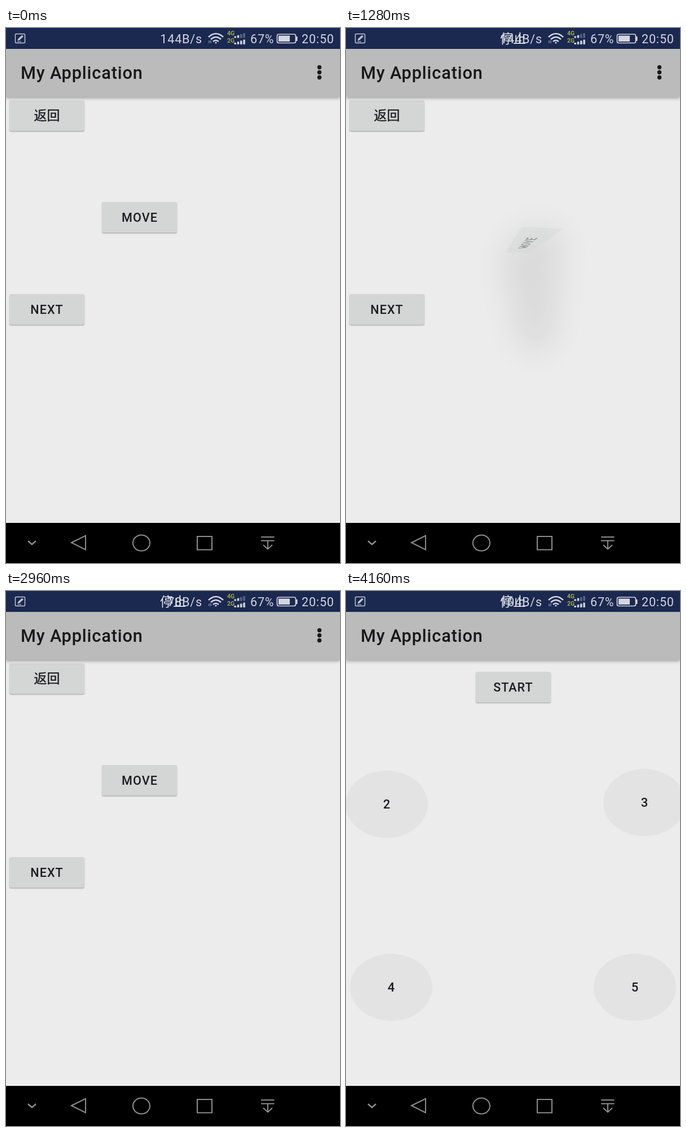
Write an HTML page that moves like this. It is 592 px wide and 947 px high and loops after 4.24 s.

```html
<!DOCTYPE html>
<html lang="en">
<head>
<meta charset="utf-8">
<title>My Application</title>
<style>
  html, body { margin: 0; width: 100%; height: 100%; overflow: hidden; background: #ececec; }
  #stage { position: relative; width: 592px; height: 947px; overflow: hidden; background: #ececec;
    font-family: Roboto, "Noto Sans CJK SC", "Noto Sans CJK", sans-serif; color: #1b1c20; }
  svg { position: absolute; left: 0; top: 0; }
  .page { position: absolute; left: 0; top: 0; width: 592px; height: 947px; background: #ececec; }
  .bar { position: absolute; top: 37px; width: 592px; height: 85px; background: #bbb;
    box-shadow: 0 2px 6px rgba(0, 0, 0, .35); }
  .bar span { position: absolute; left: 26px; line-height: 85px; font-size: 30.8px; font-weight: 500;
    letter-spacing: .8px; white-space: nowrap; color: #18181a; }
  .btn { --press: 0; position: absolute; width: 133px; height: 54px; border-radius: 3px;
    background: linear-gradient(rgba(0, 0, 0, var(--press)), rgba(0, 0, 0, var(--press))) #d4d6d5;
    box-shadow: 0 1.5px 2px rgba(0, 0, 0, .28);
    font-size: 21.6px; font-weight: 500; letter-spacing: 1px; text-indent: 1px; line-height: 55px; text-align: center; }
  #back { font-size: 23px; letter-spacing: 0; -webkit-text-stroke: .4px #1b1c20; }
  .ball { position: absolute; width: 146px; height: 119px; margin: -59.5px 0 0 -73px; border-radius: 50%;
    background: #e3e3e3; font-size: 22px; font-weight: 500; line-height: 119px; text-align: center; }
  #dot { position: absolute; width: 34px; height: 34px; margin: -18px; border-radius: 50%;
    border: 1px solid rgba(180, 184, 205, .9); background: rgba(228, 228, 228, .6); }
  .status { fill: #d3d6e0; font-size: 21.6px; letter-spacing: .8px; }
  #stop { fill: #e8eaf0; font-size: 23px; letter-spacing: 0; }
</style>
</head>
<body>
<div id="stage">
  <div class="page" id="first">
    <svg width="592" height="947"><g id="shade"></g></svg>
    <div class="btn" id="back" style="left:5.5px;top:128px">返回</div>
    <div class="btn" id="next" style="left:5.5px;top:471px">NEXT</div>
    <div class="btn" id="move" style="left:170px;top:307.5px">MOVE</div>
    <div class="bar"><span>My Application</span>
      <svg width="592" height="85" fill="#1a1a1a">
        <circle cx="555.5" cy="32.5" r="3.7"/><circle cx="555.5" cy="41.5" r="3.7"/><circle cx="555.5" cy="50.5" r="3.7"/>
      </svg>
    </div>
  </div>
  <div class="page" id="second" style="overflow:hidden">
    <div class="btn" style="left:229.5px;top:143px">START</div>
    <div class="bar"><span>My Application</span></div>
  </div>
  <div id="dot"></div>

  <svg width="592" height="947" fill="none">
    <rect width="592" height="37" fill="#1b2850"/>
    <g stroke="#c3c7d4" stroke-width="1.5">
      <rect x="16.5" y="10.5" width="17" height="16" rx="1.5"/>
      <path d="M21 22l1-3 6.5-6 2 2-6.5 6z" fill="#c3c7d4" stroke-width=".8"/>
      <path d="M20 24h7" stroke-width="1"/>
    </g>
    <text id="rate" class="status" x="348" y="27" text-anchor="end"></text>
    <text id="stop" class="status" x="273" y="27">停止</text>
    <g stroke="#d3d6e0" stroke-width="2.6">
      <path d="M359 16Q372 4 385 16M363 20Q372 12 381 20M367 24Q372 19.5 377 24"/>
      <circle cx="372" cy="26" r="1.6" fill="#d3d6e0" stroke="none"/>
      <path d="M360 22v5M363 22v5" stroke-width="1.2" stroke="#9aa1b8"/>
    </g>
    <g fill="#a0ab48" font-size="10.5" font-weight="700">
      <text x="392" y="13">4G</text><text x="392" y="26">2G</text>
    </g>
    <g id="bars"></g>
    <text class="status" x="433" y="27">67%</text>
    <rect x="480.5" y="11" width="33" height="15.5" rx="3" stroke="#d3d6e0" stroke-width="1.7"/>
    <rect x="483" y="13.5" width="20" height="10.5" fill="#d3d6e0"/>
    <rect x="514" y="15" width="2.5" height="8" fill="#d3d6e0"/>
    <text class="status" x="524" y="27">20:50</text>

    <rect y="876" width="592" height="71" fill="#000"/>
    <g stroke="#8d8d8d" stroke-width="2">
      <path d="M39 908l7 6 7-6" stroke-width="2.5"/>
      <path d="M116 911l25-12.5v25z"/>
      <ellipse cx="240" cy="911.5" rx="15" ry="14"/>
      <rect x="339" y="900" width="26" height="23.5"/>
      <path d="M452 901h23.5M452 907.5h23.5M464 908v14M456 915l8 7.5 8-7.5"/>
    </g>
  </svg>
</div>

<script>
const LOOP = 4240, STEP = 80;
const $ = id => document.getElementById(id);
const clamp = v => Math.max(0, Math.min(1, v));
const ease = u => (1 - Math.cos(Math.PI * clamp(u))) / 2;
const DEPTH = 400, REST = { x: 236.5, y: 334.5, w: 133, h: 54 };

const taps = [
  { id: 'move', at: 440, x: 240, y: 338 },
  { id: 'back', at: 1760, x: 88.5, y: 141 },
  { id: 'next', at: 3200, x: 76, y: 496 }
];

// label, resting place, drift
const balls = [
  ['2', 72, 369, 0, 8], ['3', 520, 369, 9, 5],
  ['4', 72, 709, 8, -8], ['5', 520, 709, -8, -8]
].map(([label, x, y, dx, dy]) => {
  const el = document.createElement('div');
  el.className = 'ball';
  el.textContent = label;
  el.style.left = x + 'px';
  el.style.top = y + 'px';
  $('second').append(el);
  return { el, dx, dy };
});

// signal strength: two rows of rising bars
$('bars').innerHTML = [[17.5, 2], [29, 4]].map(([base, lit]) =>
  [0, 1, 2, 3].map(i => {
    const h = 3 + i * 1.8;
    return `<rect x="${404.5 + i * 5.3}" y="${base - h}" width="3.4" height="${h}"
      fill="${i < lit ? '#d3d6e0' : '#5d6787'}"/>`;
  }).join('')).join('');

function progress(t) {
  return t < 1800 ? ease((t - 510) / 1120) : 1 - ease((t - 1800) / 1135);
}

// corner of the turned button: its place on screen and where its shadow falls
function corner(x, y, a, cx, cy) {
  const c = Math.cos(a), s = Math.sin(a);
  const rx = x * c - y * s, ry = x * s + y * c;
  const z = ry * s, k = DEPTH / (DEPTH - z), lift = Math.max(0, z);
  return {
    z,
    near: [cx + rx * k, cy + ry * c * k + 2],
    far: [cx + rx, cy + ry * c + 2 + 1.8 * lift]
  };
}

// the volume between the button and its fallen outline, flattened
function drawShadow(pts, alpha) {
  const polygon = list => `<polygon points="${list.join(' ')}"/>`;
  const sides = pts.map((q, i) => {
    const r = pts[(i + 1) % 4];
    return polygon([q.near, r.near, r.far, q.far]);
  });
  const shade = $('shade');
  shade.innerHTML = polygon(pts.map(q => q.near)) + polygon(pts.map(q => q.far)) + sides.join('');
  const top = Math.max(...pts.map(q => q.z));
  shade.style.filter = `blur(${2 + Math.max(0, top) * .22}px)`;
  shade.style.opacity = .18 * alpha;
}

function drawMove(t) {
  const p = progress(t), style = $('move').style;
  const dx = 107 * p, dy = 91 * (.3 * p + .7 * p ** 3.6);
  const sx = 1 + p, turn = 360 * p, alpha = 1 - .75 * p;
  const idle = p < .001;
  style.transform = idle ? 'none' :
    `translate(${dx}px, ${dy}px) perspective(${DEPTH}px) rotateX(${turn}deg) rotate(${turn}deg) scaleX(${sx})`;
  style.opacity = alpha;
  style.boxShadow = idle ? '' : 'none';
  $('shade').style.display = idle ? 'none' : '';

  const w = REST.w / 2 * sx, h = REST.h / 2;
  drawShadow([[-w, -h], [w, -h], [w, h], [-w, h]].map(([x, y]) =>
    corner(x, y, turn * Math.PI / 180, REST.x + dx, REST.y + dy)), alpha);
}

function drawTaps(t) {
  const dot = $('dot').style;
  dot.display = 'none';
  for (const { id, at, x, y } of taps) {
    const d = t - at;
    const level = d < 0 ? 0 : clamp(d / 70) * clamp((400 - d) / 280);
    $(id).style.setProperty('--press', .11 * level);
    if (d >= 0 && d < 140) {
      dot.display = 'block';
      dot.left = x + 'px';
      dot.top = y + 'px';
    }
  }
}

function drawPages(t) {
  const shift = 592 * ease((t - 3316) / 400);
  $('first').style.transform = `translateX(${-shift}px)`;
  $('second').style.transform = `translateX(${592 - shift}px)`;
  const drift = ease((t - 3480) / 480);
  for (const { el, dx, dy } of balls)
    el.style.transform = `translate(${dx * drift}px, ${dy * drift}px)`;
}

function draw(now) {
  const t = Math.floor(now % LOOP / STEP) * STEP;
  $('rate').textContent = (t < 1760 ? 144 : t < 3000 ? 78 : 104) + 'B/s';
  $('stop').style.display = t < 80 ? 'none' : '';
  drawMove(t);
  drawTaps(t);
  drawPages(t);
}

const start = performance.now();
function tick() {
  draw(performance.now() - start);
  requestAnimationFrame(tick);
}
tick();
</script>
</body>
</html>
```
